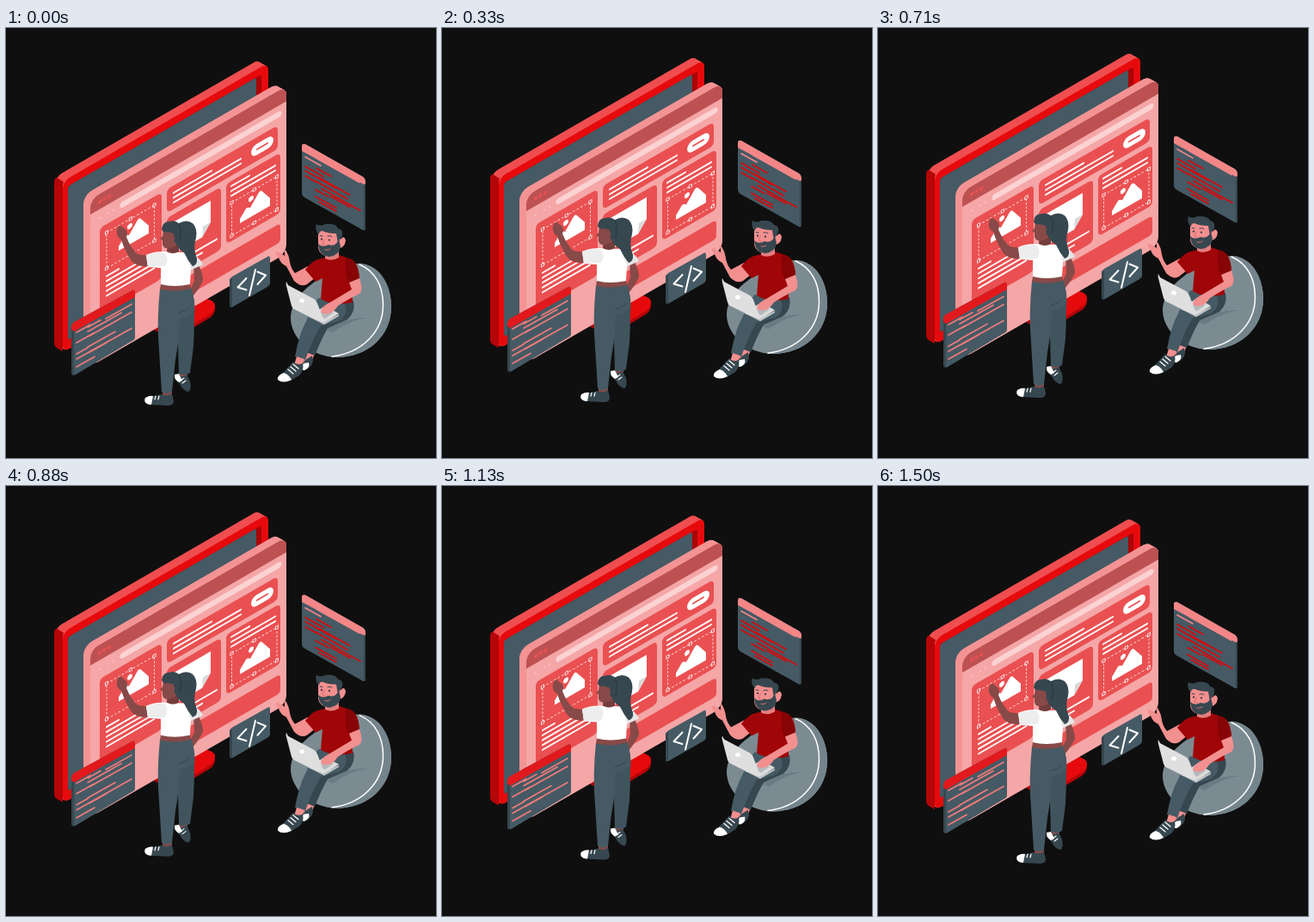
Recreate the animation shown at these times as an HTML page. Size 500 by 500 pixels, loop 1540 ms.

```html
<!DOCTYPE html>
<html lang="en">
<head>
<meta charset="utf-8">
<title>Web design scene</title>
<style>
html,body{margin:0;width:100%;height:100%;overflow:hidden;background:#0f0f0f}
svg{display:block;width:100vw;height:100vh}
.ln{fill:none;stroke-linecap:round;stroke-linejoin:round}
</style>
</head>
<body>
<svg viewBox="0 0 500 500">
<defs><clipPath id="face"><rect x="98" y="255.5" width="228" height="194.5" rx="10"/></clipPath></defs>
<g id="scene">
  <!-- stand -->
  <path d="M169 346Q170 339 180 334L205 318Q215 314 228 315Q243 317 243 326Q243 333 237 337L212 352Q202 358 190 356Q170 354 169 346z" fill="#b50508"/>
  <path d="M169 343Q170 336 180 331L205 317Q215 312 228 314Q243 316 243 323Q243 329 237 333L212 348Q202 354 190 352Q170 350 169 343z" fill="#e60a0d"/>

  <!-- monitor -->
  <g id="monitor" transform="matrix(1 -.577 0 1 0 0)"></g>
  <path d="M56 179Q56 175 59 174L67 179Q66 181 66 185V376L59 372Q56 370 56 366z" fill="#b50508"/>

  <!-- browser panel -->
  <g id="panel" transform="matrix(1 -.577 0 1 0 0)"></g>

  <!-- code windows -->
  <path d="M76 347Q76 344 79 342L147 305Q150 304 150 307V360Q150 362 148 363L81 403Q78 405 76 402z" fill="#455a64"/>
  <path d="M76 347Q76 344 79 342L147 305Q150 304 150 307V313L79 353 76 351z" fill="#e2191c"/>
  <path d="M76 351V402L79 404V353z" fill="#37474f"/>
  <path d="M344 138Q344 134 348 135L415 173Q418 175 418 178V233Q418 236 415 235L347 197Q344 195 344 192z" fill="#455a64"/>
  <path d="M344 138Q344 134 348 135L415 173Q418 175 418 178V183L344 143z" fill="#f28687"/>
  <path d="M416 181L418 182V233L416 235z" fill="#37474f"/>
  <g id="code" class="ln"></g>

  <!-- tag badge -->
  <path d="M260 294Q260 291 263 289L304 266Q307 264 307 268V297Q307 299 304 301L264 324Q260 326 260 322z" fill="#455a64"/>
  <path d="M260 292V322Q260 325 263 324V291z" fill="#37474f"/>
  <path class="ln" d="M279.5 291L269.5 301.5 279.5 304.5M290 281L283 311M292.5 283.5L302 287.5 292.5 298" stroke="#fff" stroke-width="2"/>

  <!-- bean bag -->
  <path d="M331 337C331 318 348 300 372 287C389 278 402 273 414 274C436 277 448 300 448 324C448 358 421 383 384 383C354 382 331 360 331 337z" fill="#7c8b92"/>
  <path d="M411 275C430 283 438 301 438 322C438 354 413 378 379 382Q382 383 384 383C421 383 448 358 448 324C448 300 436 277 411 275z" fill="#74848c"/>
  <path d="M370 350Q396 336 421 337Q401 339 380 354z" fill="#6b7b84"/>
  <path class="ln" d="M411 275C430 283 438.500 301 438.500 322C438.500 354 413 378 379 382" stroke="#fff" stroke-width="1.5"/>

  <!-- seated man -->
  <path d="M353 371L361 374 353 393 345 389z" fill="#f28f8f"/>
  <path d="M368 316L404 317Q407 330 397 339L374 349Q367 361 359 381L349 377Q354 356 362 342z" fill="#37474f"/>
  <path d="M363 314L394 320Q399 333 387 341L366 346Q356 363 348 386L336 382Q341 355 349 341Q354 330 363 314z" fill="#455a64"/>
  <path d="M338 382L347 385 342 396 335 392z" fill="#f28f8f"/>
  <path d="M348 386L356 381 357 388Q354 396 347 398L340 397z" fill="#37474f"/>
  <path d="M346 390L352 389Q354 395 347 398L342 397z" fill="#fff"/>
  <path d="M334 388Q338 393 345 390Q347 398 341 404L331 410Q322 413 316 409Q315 404 323 400z" fill="#37474f"/>
  <path d="M323 401Q329 403 332 409Q322 414 316 409Q315 404 323 401z" fill="#fff"/>
  <path class="ln" d="M328 397L334 402M331 394L337 399M334 391L340 396" stroke="#fff" stroke-width="1.3"/>
  <path d="M351 277L336 285Q331 279 330 272Q329 264 325 258Q323 257 324 262L324 265Q318 260 314 260Q313 263 317 267Q319 274 326 277L335 294Q343 302 350 298L365 286z" fill="#f28f8f"/>
  <path d="M367 268Q357 269 348 281L360 295 368 291 366 315Q381 324 403 319L402 297 411 291Q410 271 399 268L387 264z" fill="#a00508"/>
  <path d="M395 267Q408 268 411 291L399 297Q393 287 395 267z" fill="#870406"/>
  <path d="M371 262L387 260V267Q378 272 371 268z" fill="#e37d7e"/>
  <path d="M363 237Q373 230 387 237L389 246Q393 240 395 247Q394 255 388 256Q387 264 376 266Q365 265 363 256z" fill="#f28f8f"/>
  <path d="M363 251Q368 256 375 252Q383 255 387 246L389 254Q388 264 376 266Q364 265 363 251z" fill="#37474f"/>
  <path d="M362 238Q359 232 361 228Q366 231 371 228Q384 227 386 233Q393 234 391 242Q387 246 386 251L384 239Q374 239 368 236Q364 236 364 240z" fill="#37474f"/>
  <path class="ln" d="M365 241.500L368 242M374 242Q377 241 379 242.500" stroke="#37474f" stroke-width="1"/>
  <g fill="#263238"><circle cx="367" cy="245.500" r="1.1"/><circle cx="376" cy="246.500" r="1.1"/></g>
  <path class="ln" d="M370 246L368 251 371 252M371 258Q374 259 377 257" stroke="#d96c6e" stroke-width="1"/>
  <path d="M352 336L371 323 387 332 370 343z" fill="#dcdcdc"/>
  <path d="M361 334L371 326 381 331 371 338z" fill="#b5b9bb"/>
  <path d="M399 296L411 291Q416 305 411 309Q400 314 386 323Q380 332 374 332Q367 333 366 329Q368 323 377 319L402 304z" fill="#f28f8f"/>
  <path d="M326 295Q325 297 326 300L332 323Q333 326 335 327L368 343Q371 344 370 341L362 320Q361 317 358 315L328 299z" fill="#dfdfdf"/>
  <path d="M335 327L368 343 387 333V335L370 345z" fill="#c2c6c8"/>
  <ellipse cx="344" cy="317" rx="3" ry="2.5" fill="#fff"/>

  <!-- standing woman -->
  <path d="M218 274L222 271Q230 288 229 294Q223 306 216 313L212 308Q217 299 219 294z" fill="#874a48"/>
  <path d="M201 396L211 394 211 406 202 407z" fill="#874a48"/>
  <path d="M182 419L193 419 193 430 182 430z" fill="#874a48"/>
  <path d="M195 305L215 302Q221 318 219 334Q219 352 218 370L214 401Q207 405 201 402L200 368 196 333z" fill="#40545e"/>
  <path d="M179 303Q198 307 215 302Q220 316 219 329Q210 338 202 337Q202 360 197 386L193 423Q187 427 181 423L178 375Q175 342 179 303z" fill="#455a64"/>
  <path class="ln" d="M201 331Q209 330 214 324" stroke="#37474f" stroke-width="1"/>
  <path d="M180 298L214 296 215 303Q197 308 179 304z" fill="#874a48"/>
  <path d="M131 244Q127 238 130 232Q132 228 135 231L140 235Q142 239 140 243Q145 256 153 263L166 265 165 277Q152 278 146 271Q138 259 134 246z" fill="#874a48"/>
  <path d="M163 264Q171 260 182 260L211 261Q220 264 223 277L215 281 214 298Q195 302 180 298L180 279 165 278z" fill="#fff"/>
  <path d="M163 264Q171 261 183 261Q191 266 185 277L165 278z" fill="#ededed"/>
  <path d="M211 261Q224 264 229 275L216 281Q211 274 211 261z" fill="#e6e6e6"/>
  <path d="M188 254L202 250 201 260Q194 264 187 260z" fill="#733d3c"/>
  <path d="M183 234L198 231 201 249Q196 257 186 256Q181 255 182 247L179 245 182 242z" fill="#874a48"/>
  <path d="M181 234Q182 225 190 225Q196 223 201 227Q210 222 217 227Q223 233 221 244Q217 256 222 268Q223 275 217 277Q211 270 207 261Q201 258 197 250Q194 247 195 239L188 237Q183 239 181 234z" fill="#37474f"/>
  <path class="ln" d="M201 228Q205 235 202 248" stroke="#2c3a41" stroke-width="1.2"/>
  <ellipse cx="193" cy="244" rx="3" ry="4" fill="#874a48"/>
  <path d="M196 402Q203 408 210 403L214 411Q216 421 212 423Q206 422 202 414L196 408z" fill="#37474f"/>
  <path d="M196 403L201 402 205 410 201 412Q195 408 196 403z" fill="#fff"/>
  <path class="ln" d="M203 410L207 407M205 413L209 410" stroke="#fff" stroke-width="1.1"/>
  <path d="M181 426Q188 429 193 425L195 434Q195 439 188 439L166 438Q160 436 161 431Q166 427 173 428z" fill="#37474f"/>
  <path d="M162 430Q167 427 171 428L169 438Q159 437 162 430z" fill="#fff"/>
  <path class="ln" d="M174 428L173 432M178 428L177 432" stroke="#fff" stroke-width="1.2"/>
</g>
</svg>
<script>
const $ = id => document.getElementById(id);
const CARD = '#ea5051', WHITE = '#fff';

const box = (x, y, w, h, r, fill, more = '') =>
  `<rect x="${x}" y="${y}" width="${w}" height="${h}" rx="${r}" fill="${fill}" ${more}/>`;
const line = (x1, y1, x2, y2, color, w) =>
  `<path class="ln" d="M${x1} ${y1}L${x2} ${y2}" stroke="${color}" stroke-width="${w}"/>`;
const bar = (x1, x2, y, color = WHITE, w = 2.1) => line(x1, y, x2, y, color, w);

// a slab's thickness, as copies of its face sliding back
function slab(x, y, w, h, r, depth, fill) {
  let s = '';
  for (let i = depth; i > 0; i -= .5) s += box(x - i, y - i * 1.13, w, h, r, fill);
  return s;
}

function picture(x, y, w, h, dx, dy) {
  let s = box(x, y, w, h, 0, 'none', 'stroke="#fff" stroke-width=".8" stroke-dasharray="2.4 2"');
  for (const [u, v] of [[0, 0], [.5, 0], [1, 0], [0, 1], [.5, 1], [1, 1]])
    s += box(x + u * w - 1.6, y + v * h - 1.6, 3.2, 3.2, 0, CARD, 'stroke="#fff" stroke-width=".8"');
  return s + `<g transform="translate(${dx} ${dy})" fill="#fff"><circle cx="285" cy="363" r="3"/>
    <path d="M272 384V379L279 371Q281 370 284 373L294 361Q296 359 298 362L307 375V384z"/></g>`;
}

$('monitor').innerHTML =
  slab(66, 216.5, 239, 199, 8, 9, '#ef4e50') +
  box(66, 216.5, 239, 199, 8, '#e60a0d') +
  box(72, 225.5, 225, 179, 3, '#a90508') +
  box(72, 225.5, 219, 179, 3, '#455a64');

$('panel').innerHTML =
  slab(98, 255.5, 228, 194.5, 10, 8, '#f39394') +
  box(98, 255.5, 228, 194.5, 10, '#f5a6a7') +
  box(98, 255.5, 228, 18, 0, '#bd5152', 'clip-path="url(#face)"') +
  [109, 114.5, 120].map(x => `<circle cx="${x}" cy="265" r="2.1" fill="#ea5051"/>`).join('') +
  [109, 119, 125].map(x => `<circle cx="${x}" cy="284" r=".8" fill="#fbd5d5"/>`).join('') +
  bar(136, 317, 283.5, '#fbd3d3', 7) +
  box(109, 295.5, 72, 100.5, 5, CARD) +
  picture(117, 305.5, 55.5, 41.5, -141, -49.5) +
  [0, 1, 2, 3, 4].map(i => bar(117, i ? 172 : 131, 356 + i * 5.7)).join('') +
  box(187, 295.5, 129, 27.5, 5, CARD) +
  bar(195, 239, 304) + bar(195, 273, 309.7) + bar(195, 273, 315.3) +
  box(285, 303, 26, 13, 6.5, WHITE) + bar(292, 304, 309.5, CARD, 2) +
  box(187, 329, 63, 73, 5, CARD) +
  `<path d="M194 338H238V363L228 375H194z" fill="#fff"/><path d="M228 375L229 363H238z" fill="#d9d9d9"/>` +
  bar(194, 245, 387) + bar(194, 228, 393) +
  box(256, 329, 63, 70, 5, CARD) +
  bar(262, 283, 335) + bar(262, 313, 340.7) + bar(262, 313, 346.3) +
  picture(262.5, 354.5, 52.5, 38.5, 0, 0) +
  box(187, 411, 132, 22, 4, CARD);

const rows = (list, slope, color) =>
  list.map(([a, b, y]) => line(a, y, b, y + (b - a) * slope, color, 1.7)).join('');

$('code').innerHTML =
  rows([[82, 98, 354], [95, 110, 348], [116, 146, 338], [95, 134, 353], [82, 102, 366],
    [97, 146, 358], [82, 95, 379], [95, 127, 371], [97, 117, 377], [82, 146, 385],
    [82, 103, 394]], -.56, '#f07a7b') +
  rows([[348, 366, 150], [362, 411, 152]], .56, '#f28687') +
  rows([[348, 369, 161], [361, 378, 163], [348, 384, 166], [364, 400, 174],
    [348, 361, 172], [360, 397, 178], [367, 412, 187], [360, 375, 188],
    [360, 384, 196], [378, 400, 196], [364, 384, 202]], .56, '#d8090c');

const LOOP = 1540, PEAK = 745, RISE = 9;
function draw(now) {
  const phase = (now % LOOP - PEAK) / LOOP * 2 * Math.PI;
  const y = -RISE * (1 + Math.cos(phase)) / 2;
  $('scene').setAttribute('transform', `translate(0 ${y.toFixed(3)})`);
}
const start = performance.now();
function tick() {
  draw(performance.now() - start);
  requestAnimationFrame(tick);
}
tick();
</script>
</body>
</html>
```
